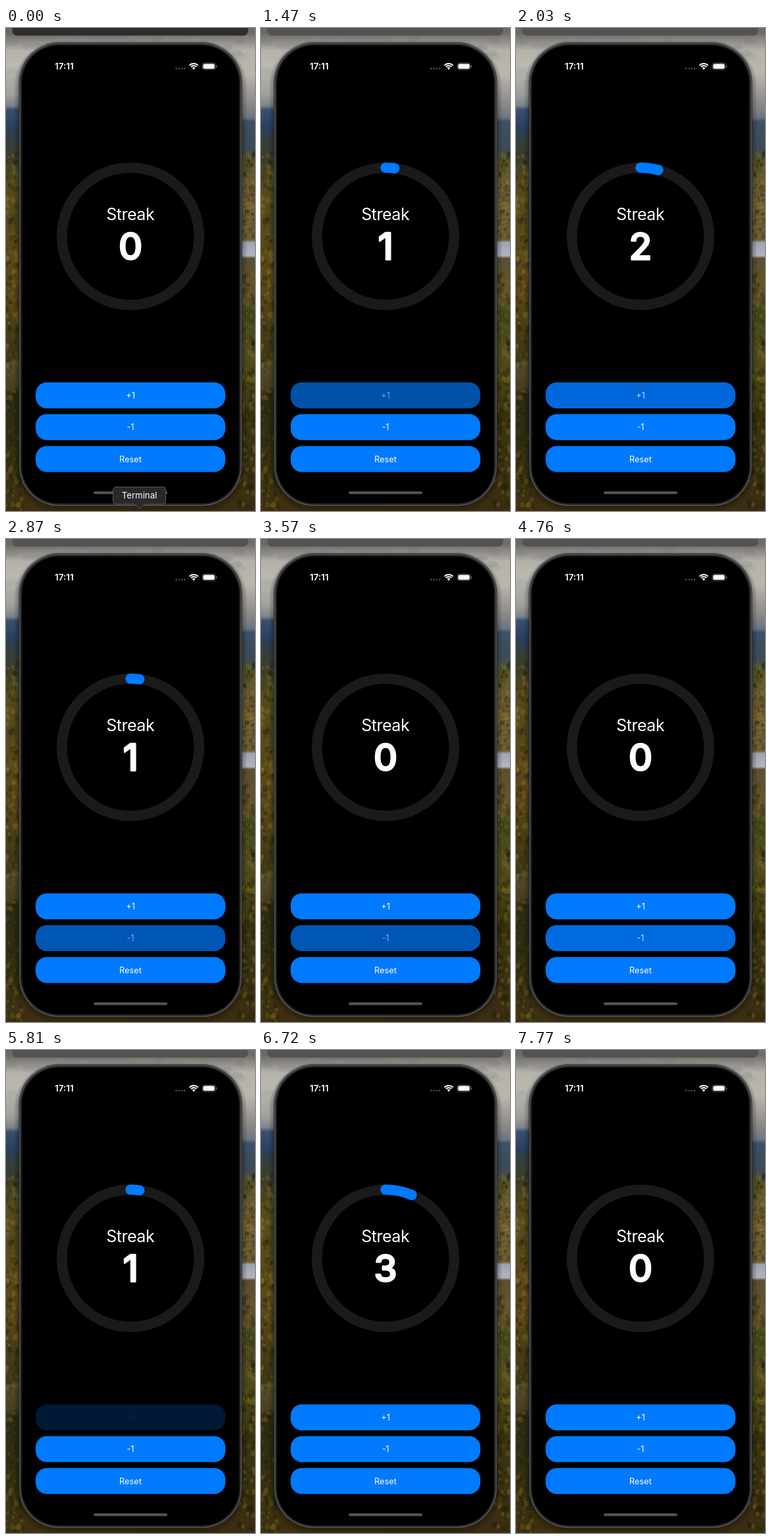
These frames come from a looping animation (378 px wide and 734 px high, 8 s). An HTML page with a canvas:

```html
<!DOCTYPE html>
<html lang="en">
<head>
<meta charset="utf-8">
<title>Streak counter</title>
<style>
  html, body { margin: 0; width: 100%; height: 100%; overflow: hidden; background: #000; }
  canvas { display: block; }
</style>
</head>
<body>
<canvas id="stage" width="378" height="734"></canvas>
<script>
const W = 378, H = 734, LOOP = 8000, FADE = 400;
const BLUE = '#007aff', FONT = 'Inter, Roboto, sans-serif';
const ctx = document.getElementById('stage').getContext('2d');

const buttons = [
  { label: '+1', y: 538.5, clicks: [1345, 1820, 5810, 6060, 6300], apply: n => n + 1 },
  { label: '-1', y: 586.8, clicks: [2730, 3430, 3700, 3968, 4250, 4540, 4830], apply: n => Math.max(0, n - 1) },
  { label: 'Reset', y: 635.2, clicks: [7280], apply: () => 0 }
];
const events = buttons
  .flatMap(b => b.clicks.map(at => ({ at, apply: b.apply })))
  .sort((a, b) => a.at - b.at);

function seeded(seed) {
  return () => (seed = (seed * 16807) % 2147483647) / 2147483647;
}

function box(c, x, y, w, h, r, fill) {
  c.beginPath();
  c.roundRect(x, y, w, h, r);
  c.fillStyle = fill;
  c.fill();
}

function text(str, x, y, size, weight = 400, spacing = 0, align = 'center') {
  ctx.font = `${weight} ${size}px ${FONT}`;
  ctx.letterSpacing = spacing + 'px';
  ctx.textAlign = align;
  ctx.fillStyle = '#fff';
  ctx.fillText(str, x, y);
  ctx.letterSpacing = '0px';
}

function vertical(c, stops) {
  const g = c.createLinearGradient(0, 0, 0, H);
  stops.forEach(([y, color]) => g.addColorStop(y / H, color));
  return g;
}

function paintLandscape(c) {
  c.fillStyle = vertical(c, [
    [0, '#aaa79f'], [55, '#bbb8b0'], [100, '#a3a19d'], [118, '#7d8489'], [124, '#38516f'],
    [152, '#283f63'], [162, '#303f45'], [200, '#3b3e26'], [240, '#564a1c'], [400, '#5a4817'],
    [500, '#3c3514'], [508, '#554c2a'], [545, '#474021'], [560, '#2b2a14'], [650, '#35310f'], [734, '#3e3011']
  ]);
  c.fillRect(0, 0, W, H);
  c.fillStyle = vertical(c, [
    [0, '#b2afa6'], [70, '#bab6ad'], [115, '#8b8988'], [136, '#6f7580'], [142, '#3c5069'],
    [180, '#3b4c54'], [205, '#54502b'], [260, '#75633a'], [322, '#6c5d35'], [326, '#9ba5b4'],
    [346, '#b0b6be'], [350, '#5a5030'], [400, '#64522f'], [432, '#41451d'], [500, '#514c1e'],
    [600, '#39350f'], [734, '#3b2d11']
  ]);
  c.fillRect(W / 2, 0, W / 2, H);

  const rnd = seeded(71);
  const tones = ['#1b1d0d', '#2c2a10', '#7d641c', '#94752a', '#4d481c'];
  for (let i = 0; i < 900; i++) {
    const left = rnd() < 0.5;
    const y = 190 + rnd() * 544;
    const x = (left ? 0 : 350) + rnd() * 28;
    const r = 0.8 + rnd() * 3;
    c.globalAlpha = 0.18 + rnd() * 0.3;
    c.fillStyle = tones[Math.floor(rnd() * (y > 540 ? 3 : 5))];
    if (!left && y > 318 && y < 352) continue;
    c.beginPath();
    c.ellipse(x, y, r, r * 1.3, 0, 0, 7);
    c.fill();
  }
  for (let i = 0; i < 60; i++) {
    c.globalAlpha = 0.12;
    c.fillStyle = i % 2 ? '#d8d5cc' : '#777d84';
    c.beginPath();
    c.ellipse(rnd() * W, 15 + rnd() * 95, 9, 5, 0, 0, 7);
    c.fill();
  }
  // terraced rows on the right slope
  c.strokeStyle = '#3f3a1d';
  c.globalAlpha = 0.5;
  for (let y = 240; y < 315; y += 7) {
    c.beginPath();
    c.moveTo(356, y + 5);
    c.lineTo(378, y);
    c.stroke();
  }
  c.globalAlpha = 1;
  const shade = c.createLinearGradient(0, 8, 0, 34);
  shade.addColorStop(0, 'rgba(0,0,0,.38)');
  shade.addColorStop(1, 'rgba(0,0,0,0)');
  c.fillStyle = shade;
  c.fillRect(0, 0, W, 34);
  for (let i = 8; i > 0; i--) box(c, 20 - i, 23 - i / 2, 338 + 2 * i, 703 + i * 2, 62 + i, 'rgba(0,0,0,.04)');
}

function paintPhone(c) {
  box(c, 19.5, 22, 339, 705, 61, '#17181a');
  box(c, 20.2, 22.7, 337.6, 703.6, 60, '#58595b');
  box(c, 21.5, 24, 335, 701, 59, '#303133');
  box(c, 23, 25.5, 332, 698, 57.5, '#151617');
  box(c, 24.5, 27, 329, 695, 56, '#000');
}

const backdrop = document.createElement('canvas');
backdrop.width = W;
backdrop.height = H;
paintLandscape(backdrop.getContext('2d'));
paintPhone(backdrop.getContext('2d'));

function drawStatusBar() {
  text('17:11', 74, 63, 13.5, 600, 0, 'left');
  for (let i = 0; i < 4; i++) box(ctx, 257 + i * 4.2, 60.3, 2.8, 2.8, 1.4, '#48484a');

  ctx.strokeStyle = '#fff';
  ctx.lineWidth = 2;
  ctx.lineCap = 'butt';
  for (const r of [9, 5.7]) {
    ctx.beginPath();
    ctx.arc(285, 63, r, -Math.PI * 0.76, -Math.PI * 0.24);
    ctx.stroke();
  }
  ctx.beginPath();
  ctx.moveTo(285, 63.5);
  ctx.arc(285, 63, 3.2, -Math.PI * 0.76, -Math.PI * 0.24);
  ctx.fillStyle = '#fff';
  ctx.fill();

  ctx.beginPath();
  ctx.roundRect(298, 53.2, 20, 10.2, 3.4);
  ctx.strokeStyle = '#69696b';
  ctx.lineWidth = 0.9;
  ctx.stroke();
  box(ctx, 299.3, 54.5, 17.4, 7.6, 2.3, '#fff');
  box(ctx, 319, 56.6, 1.3, 3.6, 0.7, '#69696b');
}

function drawRing(count) {
  const arc = (from, to, color) => {
    ctx.beginPath();
    ctx.arc(189, 316.5, 104.2, from, to);
    ctx.strokeStyle = color;
    ctx.stroke();
  };
  ctx.lineWidth = 15.6;
  ctx.lineCap = 'round';
  arc(0, Math.PI * 2, '#1a1a1a');
  const top = -Math.PI / 2;
  if (count) arc(top, top + count * Math.PI / 24, BLUE);

  text('Streak', 188.7, 292, 25, 400, -0.5);
  text(count, 189, 352.2, 56, 500);
  // a round-joined outline softens the digit's corners
  ctx.lineJoin = 'round';
  ctx.lineWidth = 2.6;
  ctx.strokeStyle = '#fff';
  ctx.strokeText(count, 189, 352.2);
}

function drawButton({ label, y, clicks }, t) {
  const last = clicks.filter(at => at <= t).pop();
  const p = last === undefined ? 1 : Math.min(1, (t - last) / FADE);
  ctx.globalAlpha = 1 - 0.8 * Math.pow(1 - p, 2.3);
  box(ctx, 45, y, 288, 39.5, 17, BLUE);
  // hide the fill below the label so both fade as one layer
  ctx.globalAlpha *= ctx.globalAlpha;
  text(label, 189, y + 24.5, 12.8);
  ctx.globalAlpha = 1;
}

function drawTooltip(t) {
  const alpha = 1 - Math.min(1, Math.max(0, (t - 350) / 300));
  if (!alpha) return;
  ctx.globalAlpha = alpha;
  ctx.beginPath();
  ctx.roundRect(162.5, 697.5, 80, 26, 4);
  ctx.fillStyle = '#29292a';
  ctx.strokeStyle = '#565657';
  ctx.lineWidth = 1;
  ctx.fill();
  ctx.stroke();
  ctx.beginPath();
  ctx.moveTo(194, 723.5);
  ctx.quadraticCurveTo(197, 724, 203, 731);
  ctx.quadraticCurveTo(209, 724, 212, 723.5);
  ctx.fill();
  ctx.stroke();
  ctx.fillRect(194, 722, 18, 2);
  text('Terminal', 202.5, 714.6, 13.2);
  ctx.globalAlpha = 1;
}

function draw(t) {
  const count = events.reduce((n, e) => e.at <= t ? e.apply(n) : n, 0);
  ctx.drawImage(backdrop, 0, 0);
  box(ctx, 9.5, -12, 358, 23.5, 7, t < 1260 ? '#2d2d2d' : '#535353');
  drawStatusBar();
  drawRing(count);
  buttons.forEach(b => drawButton(b, t));
  box(ctx, 133, 704.2, 112, 4, 2, '#545456');
  drawTooltip(t);
}

const start = performance.now();
function frame() {
  draw((performance.now() - start) % LOOP);
  requestAnimationFrame(frame);
}
draw(0);
requestAnimationFrame(frame);
</script>
</body>
</html>
```
